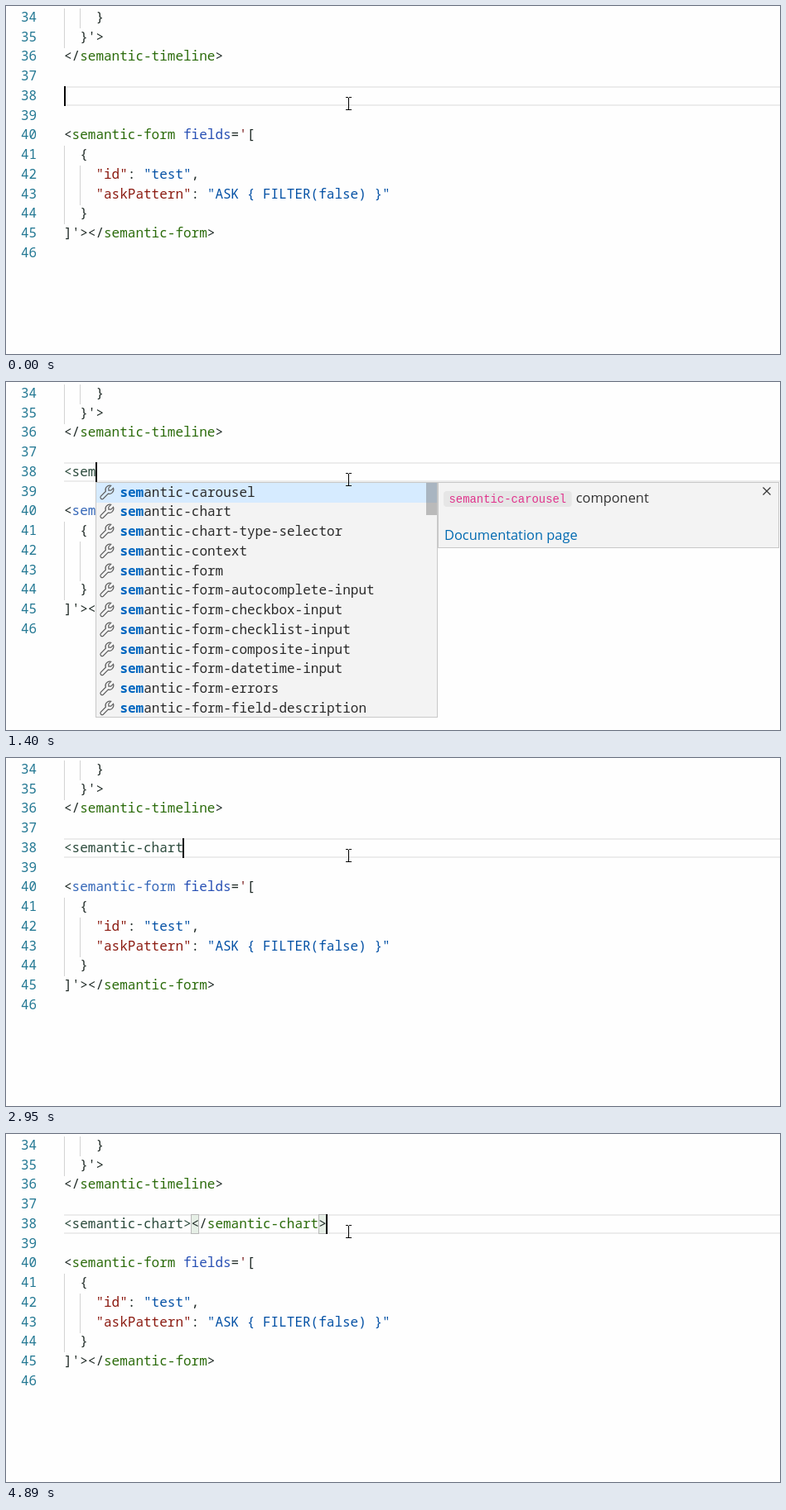
Write an HTML page with a canvas that moves like this. It is 934x421 px and loops after 5120 ms.

```html
<!DOCTYPE html>
<html lang="en">
<head>
<meta charset="utf-8">
<title>Tag completion</title>
<style>
  html, body { margin: 0; width: 100%; height: 100%; overflow: hidden; background: #fefefe; }
  canvas { display: block; }
</style>
</head>
<body>
<canvas id="stage" width="934" height="421"></canvas>
<script>
const ctx = document.getElementById('stage').getContext('2d');
const LOOP = 5120, LEFT = 70, CHAR = 9.6, ROW = 23.75;
const MONO = '16px "Noto Sans Mono", monospace';
const BOLD = 'bold ' + MONO;
const CHIP = '13.9px "Liberation Mono", monospace';
const SANS = '16.4px "Open Sans", sans-serif';
const INK = '#1f2a26', TAG = '#2b6b0b', ATTR = '#2850b4', KEY = '#8b1a10',
      VALUE = '#0451a5', QUOTE = '#7a1c1c', TYPED = '#2b4a3c', LINK = '#006ab1';

const tags = ('a abbr address area article aside audio b base bdi bdo blockquote ' +
  's samp script section select').split(' ');
const parts = ('carousel chart chart-type-selector context form form-autocomplete-input ' +
  'form-checkbox-input form-checklist-input form-composite-input form-datetime-input ' +
  'form-errors form-field-description').split(' ');
const items = tags.concat(parts.map(p => 'semantic-' + p));

const docs = {
  a: ['If the a element has an href attribute, then it',
      'represents a hyperlink (a hypertext anchor)',
      'labeled by its contents.'],
  s: ['The s element represents contents that are no',
      'longer accurate or no longer relevant.'],
  section: ['The section element represents a generic section',
            'of a document or application. A section, in this',
            'context, is a thematic grouping of content.']
};

// Each step overrides parts of the state before it.
const steps = [
  [0, { text: '', caret: true, list: false, doc: false, thumb: 0, pick: 0, marks: [], open: false, empty: false }],
  [150, { text: '<' }],
  [230, { list: true, thumb: 25 }],
  [300, { doc: true }],
  [700, { caret: false, thumb: 0 }],
  [850, { text: '<s', caret: true, thumb: 25, open: true }],
  [1160, { text: '<se', thumb: 36 }],
  [1400, { text: '<sem', thumb: 39 }],
  [1550, { text: '<semn', thumb: 41 }],
  [2090, { caret: false, thumb: 0 }],
  [2410, { pick: 1 }],
  [2550, { caret: true }],
  [2950, { text: '<semantic-chart', list: false, pick: 0 }],
  [3420, { caret: false }],
  [3570, { text: '<semantic-chart>', caret: true, open: false, marks: [0, 15] }],
  [3970, { text: '<semantic-chart><' }],
  [4030, { marks: [] }],
  [4110, { list: true, thumb: 25 }],
  [4430, { list: false, caret: false, thumb: 0 }],
  [4810, { text: '<semantic-chart></', caret: true, empty: true }],
  [4890, { text: '<semantic-chart></semantic-chart>', empty: false, marks: [16, 32] }]
];

const stateAt = t => Object.assign({}, ...steps.filter(s => s[0] <= t).map(s => s[1]));
const baseline = line => Math.round(18.9 + (line - 34) * ROW);
const popupX = col => Math.floor(69.6 + CHAR * col);

function rect(x, y, w, h, color) {
  ctx.fillStyle = color;
  ctx.fillRect(x, y, w, h);
}

function label(str, x, y, color, font = MONO) {
  ctx.font = font;
  ctx.fillStyle = color;
  ctx.fillText(str, x, y);
}

function box(x, y, w, h) {
  rect(x, y, w, h, '#c8c8c8');
  rect(x + 1, y + 1, w - 2, h - 2, '#f3f3f3');
}

function codeLine(line, col, ...runs) {
  for (const [str, color] of runs) {
    label(str, LEFT + col * CHAR, baseline(line), color);
    col += str.length;
  }
}

function guide(col, first, last) {
  const y = Math.round(2.5 + (first - 34) * ROW);
  rect(Math.floor(LEFT + col * CHAR), y, 1, Math.round((last - first + 1) * ROW), '#d3d3d3');
}

function drawEditor(s) {
  rect(0, 0, 934, 421, '#fefefe');
  guide(0, 34, 35);
  guide(2, 34, 34);
  guide(0, 41, 44);
  guide(2, 42, 43);
  rect(LEFT, 97, 864, 2, '#ececec');
  rect(LEFT, 119, 864, 2, '#ececec');
  for (let n = 34; n <= 46; n++) label(String(n), 18, baseline(n), '#237893');

  codeLine(34, 4, ['}', INK]);
  codeLine(35, 2, ["}'>", INK]);
  codeLine(36, 0, ['</', INK], ['semantic-timeline', TAG], ['>', INK]);
  codeLine(40, 0, ['<', INK], ['semantic-form', s.open ? '#3567b8' : TAG],
    [' fields', ATTR], ['=', INK], ["'", QUOTE], ['[', INK]);
  codeLine(41, 2, ['{', INK]);
  codeLine(42, 4, ['"id"', KEY], [': ', INK], ['"test"', VALUE], [',', INK]);
  codeLine(43, 4, ['"askPattern"', KEY], [': ', INK], ['"ASK { FILTER(false) }"', VALUE]);
  codeLine(44, 2, ['}', INK]);
  codeLine(45, 0, ["]'></", INK], ['semantic-form', TAG], ['>', INK]);

  for (const col of s.marks) {
    const x = Math.floor(LEFT + col * CHAR);
    rect(x, 97, 10, 24, '#b9b9b9');
    rect(x + 1, 98, 8, 22, '#e6efe6');
  }
  codeLine(38, 0, [s.text.slice(0, 16), TYPED], [s.text.slice(16, 18), INK],
    [s.text.slice(18, 32), TAG], [s.text.slice(32), INK]);
  if (s.caret) rect(Math.floor(LEFT + 9.59 * s.text.length), 97, 2, 24, '#000');
}

const wrench = new Path2D('M6.9 6.9L1.9 11.9A1.8 1.8 0 0 0 4.4 14.4L9.4 9.3' +
  'A4.4 4.4 0 0 0 14.6 3.6L12.2 6L9.9 5.9L9.8 3.7L12.2 1.2A4.4 4.4 0 0 0 6.9 6.9Z');

function drawWrench(x, y) {
  ctx.save();
  ctx.translate(x, y);
  ctx.scale(1.2, 1.2);
  ctx.strokeStyle = '#616161';
  ctx.lineWidth = 1;
  ctx.stroke(wrench);
  ctx.restore();
}

// Indexes of the typed letters inside a name, or null if they do not fit.
function match(name, typed) {
  const hits = [];
  let from = 0;
  for (const ch of typed) {
    const at = name.indexOf(ch, from);
    if (at < 0 || (!hits.length && at > 0)) return null;
    hits.push(at);
    from = at + 1;
  }
  return hits;
}

function drawList(s) {
  const typed = s.text.slice(s.text.lastIndexOf('<') + 1);
  const names = items.filter(n => match(n, typed)).slice(0, 12);
  const x = popupX(s.text.length);
  box(x, 121, 413, 285);
  rect(x + 1, Math.round(122 + s.pick * ROW), 411, 24, '#d6ebff');
  names.forEach((name, i) => {
    const y = baseline(39 + i) + 1;
    const hits = match(name, typed);
    drawWrench(x + 4, y - 15);
    [...name].forEach((ch, k) => {
      const hit = hits.includes(k);
      label(ch, x + 29.4 + k * CHAR, y, hit ? '#0066bf' : '#2a2a2a', hit ? BOLD : MONO);
    });
  });
  if (s.thumb) rect(x + 399, 122, 13, s.thumb, 'rgba(100,100,100,.4)');
  if (s.doc) drawDoc(x + 413, names[s.pick]);
}

function drawDoc(x, name) {
  const lines = docs[name];
  if (lines) {
    const n = lines.length;
    box(x, 121, 412, 54 + 23 * n);
    lines.forEach((str, i) => label(str, x + 8, 145 + 23 * i, '#333', SANS));
    label('ZWK Reference', x + 8, 164 + 23 * n, LINK, SANS);
  } else {
    box(x, 121, 412, 80);
    ctx.font = CHIP;
    const w = ctx.measureText(name).width + 13;
    ctx.fillStyle = '#e6e6e6';
    ctx.beginPath();
    ctx.roundRect(x + 7, 132, w, 19, 4);
    ctx.fill();
    label(name, x + 13.5, 146, '#e0338c', CHIP);
    label('component', x + 12 + w, 146, '#333', SANS);
    label('Documentation page', x + 8, 191, LINK, SANS);
  }
  const cx = x + 397, cy = 132;
  ctx.strokeStyle = '#333';
  ctx.lineWidth = 1.2;
  ctx.beginPath();
  ctx.moveTo(cx - 4.5, cy - 4.5);
  ctx.lineTo(cx + 4.5, cy + 4.5);
  ctx.moveTo(cx + 4.5, cy - 4.5);
  ctx.lineTo(cx - 4.5, cy + 4.5);
  ctx.stroke();
}

function drawEmpty(s) {
  const x = popupX(s.text.length);
  box(x, 121, 538, 23);
  label('No suggestions.', x + 6, 138, '#2a2a2a');
}

function drawPointer() {
  rect(413, 111, 1, 15, '#000');
  for (const y of [110, 125]) {
    rect(410, y, 3, 1, '#000');
    rect(414, y, 3, 1, '#000');
  }
}

function frame(now) {
  const s = stateAt(now % LOOP);
  drawEditor(s);
  if (s.list) drawList(s);
  if (s.empty) drawEmpty(s);
  drawPointer();
  requestAnimationFrame(frame);
}
requestAnimationFrame(frame);
</script>
</body>
</html>
```
